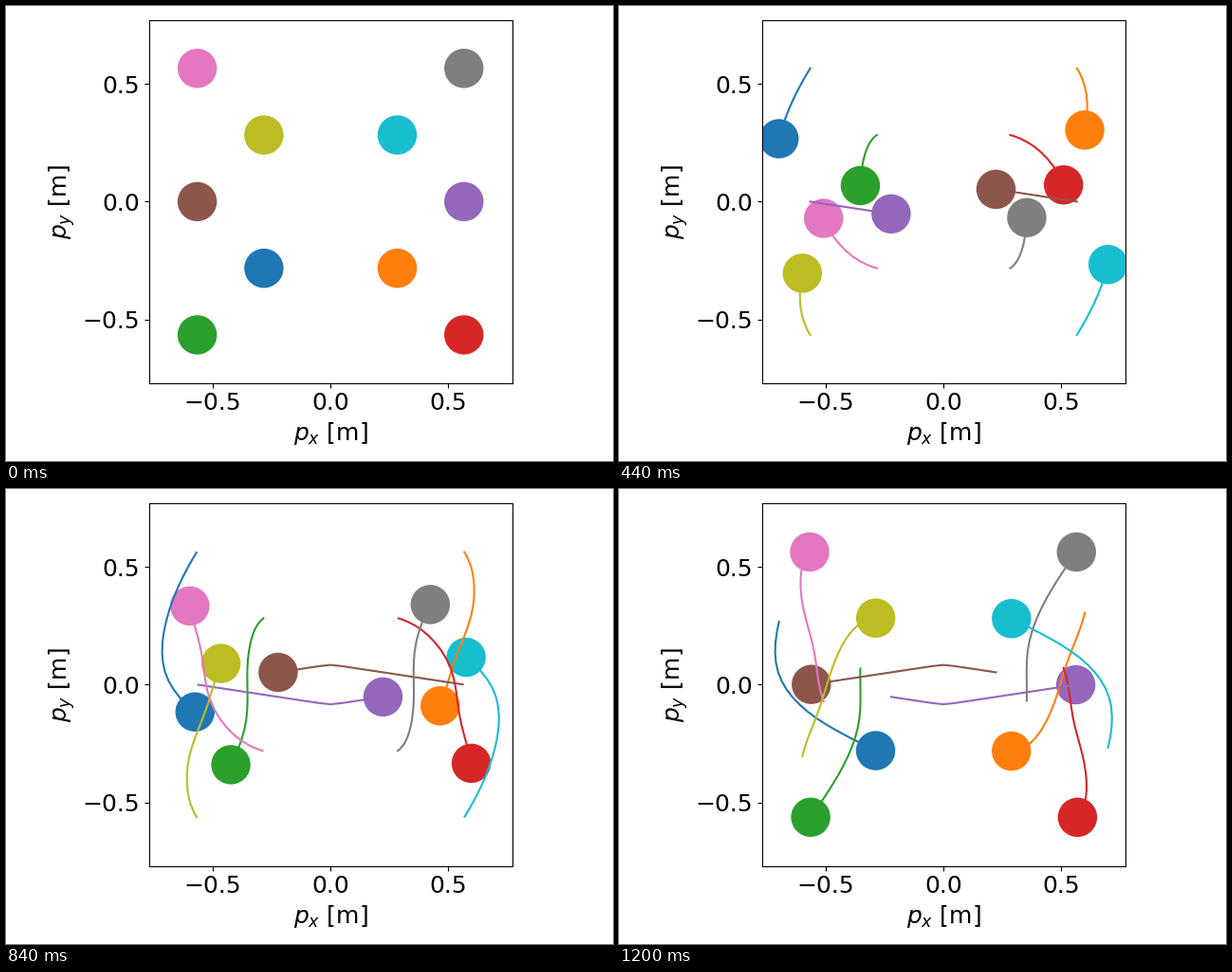
These frames come from a looping animation (640x480 px, 1.24 s). A matplotlib script:

```python
import numpy as np
import matplotlib.pyplot as plt
from matplotlib.animation import FuncAnimation

STEPS = 30       # motion steps from start to goal
TRAIL = 20       # states kept in each trail
RADIUS = 0.0834
LIMIT = 0.77
OUTER = 0.8 / np.sqrt(2)
INNER = OUTER / 2


def curve(*points):
    """Smooth path through evenly timed points, at rest at both ends."""
    p = np.array(points)
    n = len(p) - 2
    system = 4 * np.eye(n) + np.eye(n, k=1) + np.eye(n, k=-1)
    m = np.zeros_like(p)
    m[1:-1] = np.linalg.solve(system, 3 * (p[2:] - p[:-2]))

    t = np.linspace(0, n + 1, STEPS + 1)
    i = np.minimum(t.astype(int), n)
    u = (t - i)[:, None]
    return ((1 + 2 * u) * (1 - u) ** 2 * p[i] + u ** 2 * (3 - 2 * u) * p[i + 1]
            + u * (1 - u) * ((1 - u) * m[i] - u * m[i + 1]))


def crossing(ramp=4.6, slope=0.152, bend=0.017):
    """Straight run across the middle that dips just enough to pass."""
    s = np.arange(STEPS) + 0.5
    speed = np.minimum(1, np.minimum(s, STEPS - s) / ramp)
    done = np.append(0, np.cumsum(speed)) / speed.sum()
    x = OUTER * (2 * done - 1)
    y = slope * (np.hypot(x, bend) - np.hypot(OUTER, bend))
    return np.column_stack([x, y])


half = [
    curve((-OUTER, OUTER), (-.623, .464), (-.698, .267), (-.702, .053),
          (-.575, -.116), (-.388, -.230), (-INNER, -INNER)),
    curve((OUTER, OUTER), (.600, .485), (.599, .304), (.529, .107),
          (.465, -.090), (.367, -.249), (INNER, -INNER)),
    curve((-INNER, INNER), (-.322, .233), (-.353, .068), (-.357, -.143),
          (-.423, -.340), (-.521, -.501), (-OUTER, -OUTER)),
    curve((INNER, INNER), (.384, .234), (.509, .071), (.548, -.135),
          (.597, -.334), (.599, -.503), (OUTER, -OUTER)),
    crossing(),
]
# The other five agents mirror these through the centre.
paths = half + [-p for p in reversed(half)]

fig, ax = plt.subplots(figsize=(6.4, 4.8), dpi=100)
ax.set_aspect("equal")
ax.set(xlim=(-LIMIT, LIMIT), ylim=(-LIMIT, LIMIT),
       xticks=[-0.5, 0, 0.5], yticks=[-0.5, 0, 0.5])
ax.set_xlabel("$p_x$ [m]", fontsize=18)
ax.set_ylabel("$p_y$ [m]", fontsize=18)
ax.tick_params(labelsize=18)
fig.tight_layout()

discs = [ax.add_patch(plt.Circle(p[-1], RADIUS, color=f"C{i}", linewidth=0))
         for i, p in enumerate(paths)]
trails = [ax.plot([], [], color=f"C{i}")[0] for i in range(len(paths))]


def draw(k):
    # The loop opens on the goal state, without trails.
    for p, disc, trail in zip(paths, discs, trails):
        disc.center = p[k - 1]
        trail.set_data(*p[max(0, k - TRAIL):k].T)
    return discs + trails


anim = FuncAnimation(fig, draw, frames=STEPS + 1, interval=40,
                     repeat=True, repeat_delay=0)
plt.show()
```
